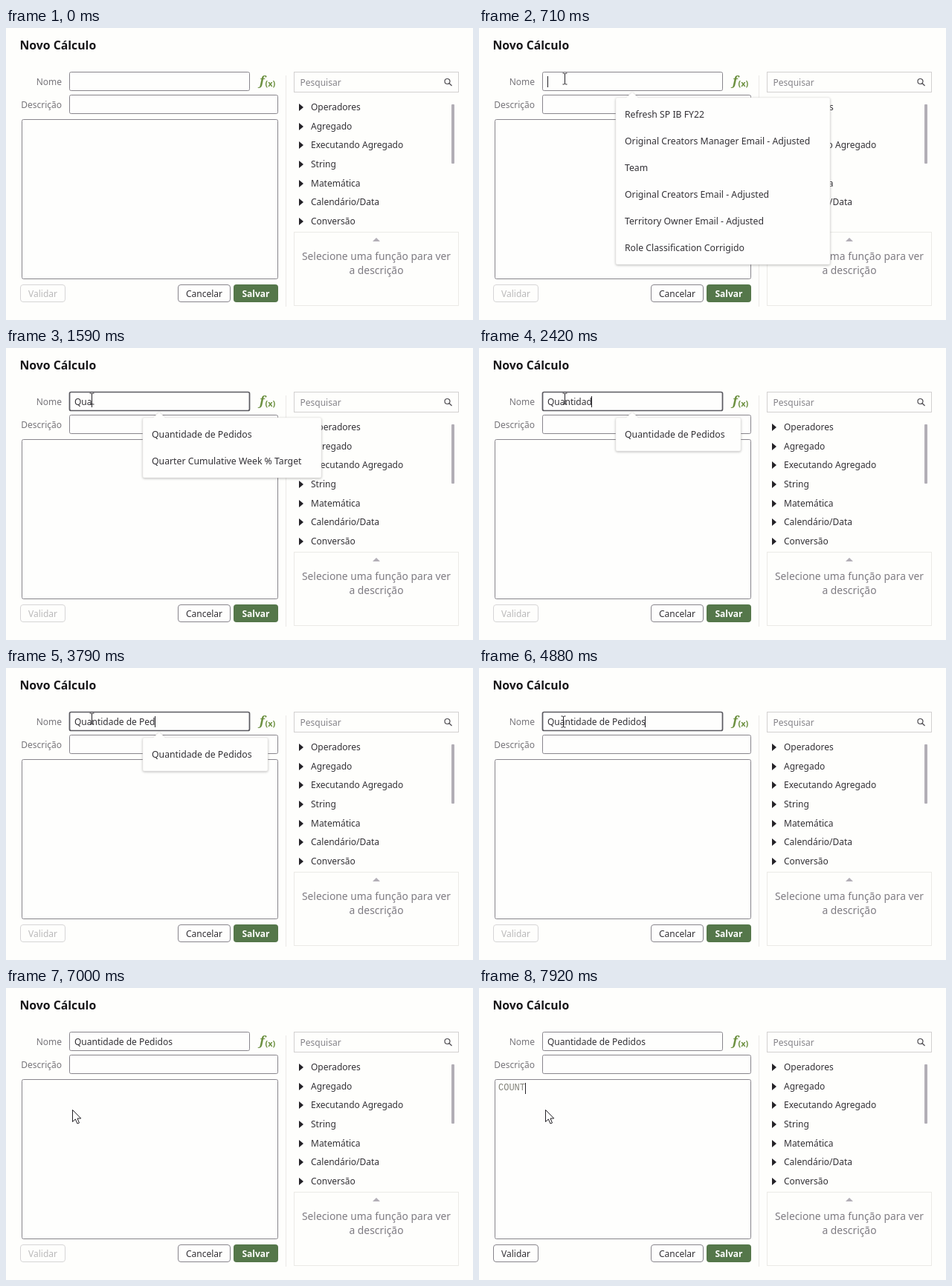
These frames come from a looping animation (628 px wide and 394 px high, 8 s). An HTML page:

```html
<!DOCTYPE html>
<html lang="pt">
<head>
<meta charset="utf-8">
<title>Novo Cálculo</title>
<style>
  html, body { margin: 0; width: 100%; height: 100%; overflow: hidden; background: #fefefc; }
  svg { display: block; width: 628px; height: 394px; }
  text { font: 12px "Noto Sans", "Open Sans", sans-serif; fill: #333136; white-space: pre; }
  .title { font-size: 15.8px; font-weight: 700; fill: #18171a; }
  .label { fill: #77757a; }
  .hint { fill: #858388; }
  .desc { font-size: 13.85px; fill: #7e7b82; text-anchor: middle; }
  .item { font-size: 12.25px; }
  .code { font-family: "Liberation Mono", monospace; fill: #83837a; }
  .box { fill: #fefefd; stroke: #88858c; }
  .soft { fill: none; stroke: #ebeae6; }
  .dark { fill: #242227; }
  .gray { fill: #b2aeb6; }
  .green { fill: #6c9040; font-weight: 700; }
  #popup { filter: drop-shadow(0 1px 1.5px #0004); }
  #popup path { fill: #fefefd; stroke: #ecebea; stroke-width: .6; }
</style>
</head>
<body>
<svg viewBox="0 0 628 394">
  <text class="title" x="18.500" y="29">Novo Cálculo</text>
  <text class="label" x="75" y="77" text-anchor="end">Nome</text>
  <text class="label" x="75" y="108" text-anchor="end">Descrição</text>

  <rect id="nameBox" class="box" x="85.500" y="59.500" width="242" height="25" rx="2"/>
  <rect class="box" x="85.500" y="90.500" width="280" height="25" rx="2"/>
  <rect class="box" x="21.500" y="123.500" width="344" height="215" rx="2"/>
  <text class="green" x="341" y="77" style="font:italic 700 17px 'Noto Serif',serif">f</text>
  <text class="green" x="348.500" y="78.500" style="font-size:11px">(x)</text>

  <g id="validate">
    <rect class="box" x="19.500" y="346.500" width="60" height="23" rx="3.500"/>
    <text x="30" y="363">Validar</text>
  </g>
  <rect class="box" x="231.500" y="346.500" width="70" height="23" rx="3.500"/>
  <text x="242" y="363">Cancelar</text>
  <rect x="306" y="346" width="60" height="24" rx="4" fill="#55774a"/>
  <text x="336" y="363" text-anchor="middle" style="fill:#fefefd;font-weight:600">Salvar</text>

  <path class="soft" d="M376.500 64V376"/>
  <rect class="soft" x="387.500" y="59.500" width="221" height="27" style="stroke:#d2d0d0"/>
  <text class="hint" x="395.500" y="78">Pesquisar</text>
  <path d="M597 72a3.500 3.500 0 1 1-7 0a3.500 3.500 0 1 1 7 0M596 74.500L599.500 78" fill="none" stroke="#4b494e" stroke-width="1.200"/>
  <g id="functions"></g>
  <rect class="gray" x="599" y="103" width="4" height="80" rx="1"/>
  <rect class="soft" x="387.500" y="275.500" width="221" height="99"/>
  <path class="gray" d="M493 288l5-5l5 5z"/>
  <text class="desc" x="498" y="313">Selecione uma função para ver</text>
  <text class="desc" x="498" y="332">a descrição</text>

  <text id="name" x="92" y="77"></text>
  <text id="code" class="code" x="26" y="138"></text>
  <g id="popup"><path/><g></g></g>
  <rect id="caret" class="dark" width="1" height="15"/>
  <path id="beam" d="M-3-7.500h2l1 1l1-1h2M0-6.500V6.500M-3 7.500h2l1-1l1 1h2" fill="none" stroke="#242227"/>
  <path id="arrow" d="M.5 .5V16.500L4.300 13L7 19L9.500 18L7 12H11.800z" fill="#fefefd" stroke="#242227"/>
</svg>
<script>
const LOOP = 8000;
const NAME = "Quantidade de Pedidos";
const NAME_KEYS = [1210, 1380, 1510, 1750, 1880, 1960, 2130, 2250, 2380, 2500, 2750,
  2840, 2960, 3090, 3420, 3500, 3540, 3830, 3920, 4000, 4090];
const CODE_KEYS = [7120, 7210, 7420, 7540, 7790];

// Suggestion lists: start time, right edge, entries
const LISTS = [
  [0, 472, ["Refresh SP IB FY22", "Original Creators Manager Email - Adjusted", "Team",
    "Original Creators Email - Adjusted", "Territory Owner Email - Adjusted",
    "Role Classification Corrigido"]],
  [1290, 424, [NAME, "Quarter Cumulative Week % Target"]],
  [1840, 352, [NAME]]
];

// Pointer path: time, x, y
const PATH = [[340, 290, 400], [600, 115.5, 68.5], [4750, 115.5, 68.5],
  [4880, 113.5, 72.5], [5000, 112, 80], [5250, 89, 164]];

const $ = id => document.getElementById(id);
const clamp = v => Math.min(1, Math.max(0, v));
const ramp = (t, a, b) => clamp((t - a) / (b - a));
const typed = (text, keys, t) => text.slice(0, keys.filter(k => k <= t).length);
const show = (el, on) => el.style.display = on ? "" : "none";
const place = (el, x, y) => el.setAttribute("transform", `translate(${x} ${y})`);

$("functions").innerHTML = ["Operadores", "Agregado", "Executando Agregado", "String",
  "Matemática", "Calendário/Data", "Conversão"].map((s, i) => {
    const y = Math.round(107 + 25.67 * i);
    return `<path class="dark" d="M394 ${y - 5}l6 5l-6 5z"/><text x="410" y="${y + 4}">${s}</text>`;
  }).join("");

function pointer(t) {
  const i = PATH.findIndex(p => p[0] > t);
  if (i < 0) return PATH.at(-1).slice(1);
  if (!i) return PATH[0].slice(1);
  const [a, b] = [PATH[i - 1], PATH[i]];
  const k = ramp(t, a[0], b[0]), e = k * k * (3 - 2 * k);
  return [a[1] + (b[1] - a[1]) * e, a[2] + (b[2] - a[2]) * e];
}

let shown;
function drawPopup(t) {
  const [box, items] = $("popup").children;
  $("popup").style.opacity = ramp(t, 600, 700) * (1 - ramp(t, 4500, 4660));
  const list = LISTS.findLast(l => l[0] <= t);
  if (list === shown) return;
  shown = list;
  const [, right, names] = list;
  box.setAttribute("d", `M186 94H198L206 86.500L214 94H${right - 2}q2 0 2 2V${101 + 36 * names.length}q0 2-2 2H186q-2 0-2-2V96q0-2 2-2`);
  items.innerHTML = names.map((s, i) =>
    `<text class="item" x="196" y="${121 + 36 * i}">${s}</text>`).join("");
}

function draw(t) {
  const name = $("name"), code = $("code");
  name.textContent = typed(NAME, NAME_KEYS, t);
  code.textContent = typed("COUNT", CODE_KEYS, t);

  const focus = ramp(t, 760, 880) * (t < 6000 ? 1 : 0);
  $("nameBox").style.strokeWidth = 1 + 0.7 * focus;
  $("nameBox").style.stroke = focus ? "#5a5960" : "";
  $("validate").style.opacity = 0.33 + 0.67 * ramp(t, 7420, 7800);

  const inName = t < 6000;
  const field = inName ? name : code;
  const width = field.textContent ? field.getComputedTextLength() : 0;
  place($("caret"), Math.floor((inName ? 92 : 26) + width), inName ? 65 : 128);
  show($("caret"), t >= 620 && t < 5750 || t >= 6000 && t < 6500 || t >= 7040);

  const [x, y] = pointer(t);
  const overName = x > 85 && x < 328 && y > 59 && y < 86;
  show($("beam"), overName);
  show($("arrow"), !overName);
  place(overName ? $("beam") : $("arrow"), x, y);
  drawPopup(t);
}

function frame() {
  draw(performance.now() % LOOP);
  requestAnimationFrame(frame);
}
frame();
</script>
</body>
</html>
```
